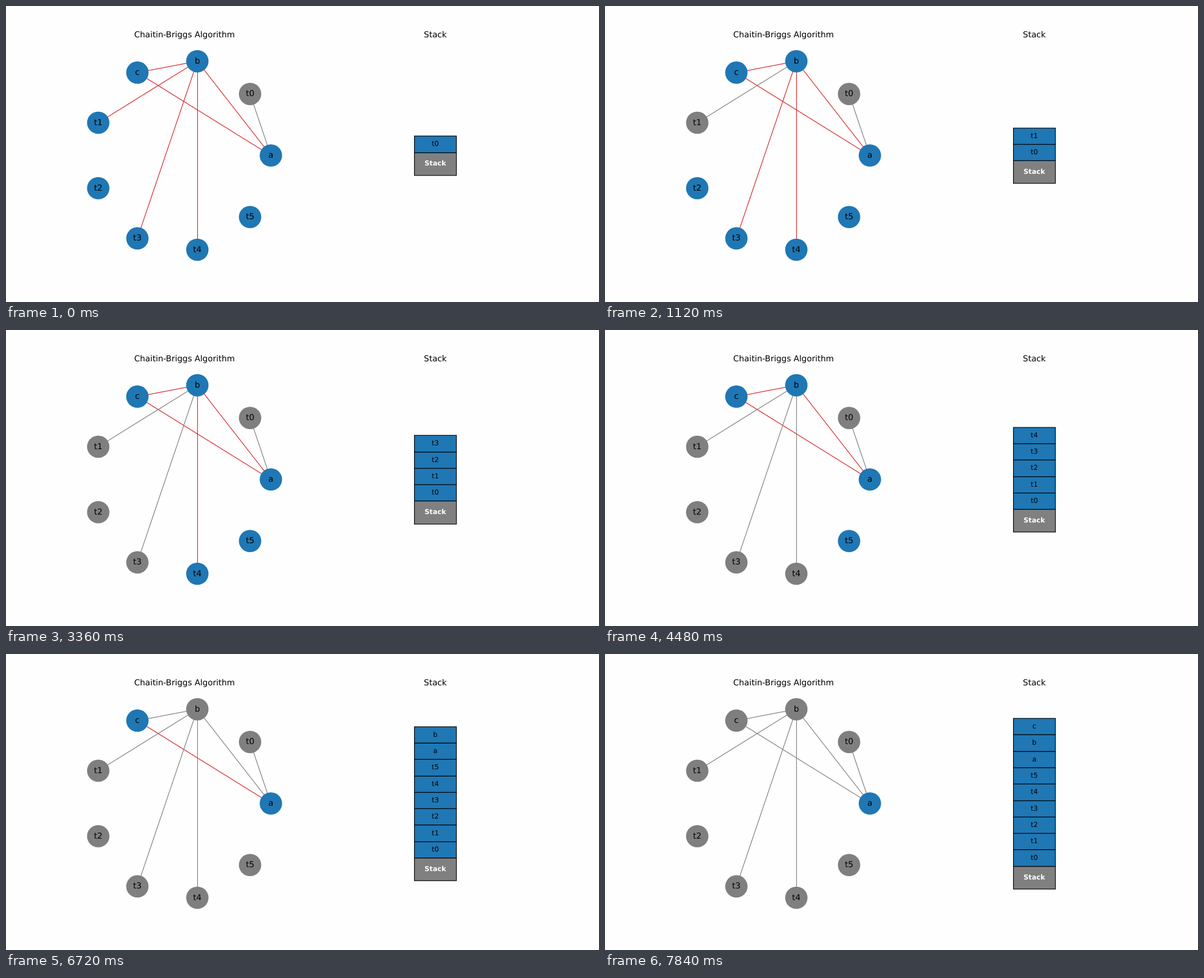
Write an HTML page that moves like this. It is 1058x529 px and loops after 8 s.

```html
<!DOCTYPE html>
<html lang="en">
<head>
<meta charset="utf-8">
<title>Chaitin-Briggs Algorithm</title>
<style>
  html, body { margin: 0; width: 100%; height: 100%; overflow: hidden; background: #fefefe; }
  svg { display: block; width: 1058px; height: 529px; }
  text {
    font: 14.69px "DejaVu Sans", sans-serif;
    text-anchor: middle;
    text-rendering: geometricPrecision;
  }
  line { stroke: #d62728; stroke-width: 1.22; }
  circle { fill: #1f77b4; }
  line.off { stroke: #7f7f7f; }
  circle.off { fill: #7f7f7f; }
  rect { fill: #1f77b4; stroke: #000; stroke-width: 1.22; }
  rect.base { fill: #808080; }
  #stack text { font-size: 12.24px; }
  #stack text.base { font-weight: bold; fill: #fff; }
</style>
</head>
<body>
<svg viewBox="0 0 1058 529">
  <text x="318.6" y="56.1">Chaitin-Briggs Algorithm</text>
  <text x="765.9" y="56.1">Stack</text>
  <g id="graph"></g>
  <g id="stack"></g>
</svg>
<script>
const LOOP = 8000, STEP = 1120;
const CX = 313.8, CY = 267.15, RX = 158.8, RY = 171.05, R = 19.97;
const ITEM_H = 29.33, BASE_H = 40.73, LEFT = 728.7, WIDTH = 74.9;

const names = ["a", "t0", "b", "c", "t1", "t2", "t3", "t4", "t5"];
const edges = [["a", "t0"], ["a", "b"], ["a", "c"], ["b", "c"], ["b", "t1"], ["b", "t3"], ["b", "t4"]];
const removed = ["t0", "t1", "t2", "t3", "t4", "t5", "b", "c"];
const pushed = ["t0", "t1", "t2", "t3", "t4", "t5", "a", "b", "c"];

const pos = {};
names.forEach((name, i) => {
  const angle = i * 2 * Math.PI / names.length;
  pos[name] = { x: CX + RX * Math.cos(angle), y: CY - RY * Math.sin(angle) };
});

// Align to the half-pixel grid of a 1200 px wide plot.
const SCALE = 1200 / 1058;
const snap = v => (Math.floor(v * SCALE + 0.5) + 0.5) / SCALE;

const label = (x, y, str, cls = "") => `<text class="${cls}" x="${x}" y="${y}">${str}</text>`;

function drawGraph(step) {
  const off = new Set(removed.slice(0, step + 1));
  const cls = (...ends) => ends.some(e => off.has(e)) ? "off" : "";
  const lines = edges.map(([u, v]) => {
    const p = pos[u], q = pos[v];
    const upright = Math.abs(p.x - q.x) < 0.01;
    const fit = x => upright ? snap(x) : x;
    return `<line class="${cls(u, v)}" x1="${fit(p.x)}" y1="${p.y}" x2="${fit(q.x)}" y2="${q.y}"/>`;
  });
  const nodes = names.map(n => {
    const { x, y } = pos[n];
    return `<circle class="${cls(n)}" cx="${x}" cy="${y}" r="${R}"/>` + label(x, y + 4.05, n);
  });
  return lines.concat(nodes).join("");
}

function box(y, h, str, cls) {
  const top = snap(y);
  return `<rect class="${cls}" x="${LEFT}" y="${top}" width="${WIDTH}" height="${snap(y + h) - top}"/>` +
    label(765.9, y + h / 2 + 3.4, str, cls);
}

function drawStack(step) {
  // "a" and "b" are pushed together.
  const count = step < 6 ? step + 1 : step + 2;
  const baseY = CY + (count * ITEM_H - BASE_H) / 2;
  const items = pushed.slice(0, count).map((n, i) => box(baseY - (i + 1) * ITEM_H, ITEM_H, n, ""));
  return box(baseY, BASE_H, "Stack", "base") + items.join("");
}

const graph = document.getElementById("graph");
const stack = document.getElementById("stack");
let shown = -1;

function tick() {
  const step = Math.floor(performance.now() % LOOP / STEP);
  if (step !== shown) {
    shown = step;
    graph.innerHTML = drawGraph(step);
    stack.innerHTML = drawStack(step);
  }
  requestAnimationFrame(tick);
}
tick();
</script>
</body>
</html>
```
